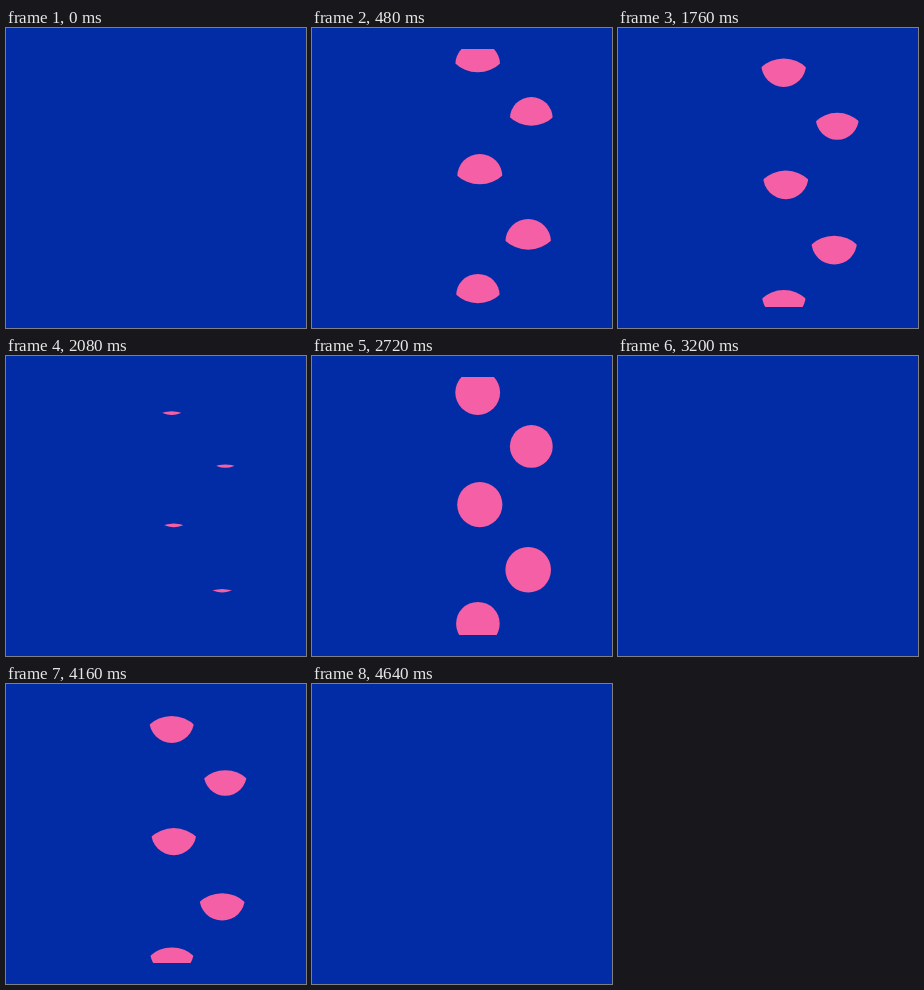
Write an HTML page with a canvas that moves like this. It is 300 px wide and 300 px high and loops after 4800 ms.

```html
<!DOCTYPE html>
<html lang="en">
<head>
<meta charset="utf-8">
<title>Lenses</title>
<style>
  html, body { margin: 0; height: 100%; overflow: hidden; background: #022ca6; }
  canvas { display: block; }
</style>
</head>
<body>
<canvas id="stage" width="300" height="300"></canvas>
<script>
const ctx = document.getElementById('stage').getContext('2d');
const LOOP = 4800, STEP = 80, TAU = Math.PI * 2;
const COVER = 1.48; // radius of the sliding disc, in dot radii

// x, y, radius
const dots = [
  [165.7, 36.5, 22.4],
  [219.3, 90.4, 21.4],
  [167.8, 148.6, 22.6],
  [216.2, 213.8, 22.8],
  [165.9, 267.7, 21.8]
];

function bezier(x1, y1, x2, y2) {
  const at = (a, b, s) => 3 * a * s * (1 - s) ** 2 + 3 * b * s * s * (1 - s) + s ** 3;
  return x => {
    if (x <= 0) return 0;
    if (x >= 1) return 1;
    let lo = 0, hi = 1;
    for (let i = 0; i < 30; i++) {
      const mid = (lo + hi) / 2;
      if (at(x1, x2, mid) < x) lo = mid; else hi = mid;
    }
    return at(y1, y2, lo);
  };
}
const easeInOut = bezier(0.42, 0, 0.58, 1);
const ease = bezier(0.25, 0.1, 0.25, 1);

const move = (from, to, p) => from + (to - from) * p;

// Vertical offset of the sliding disc, in dot radii
function offset(t) {
  const c = t < LOOP / 2 ? t : t - LOOP / 2 + 12;
  return c < 1100
    ? move(2.54, -2.49, easeInOut((c + 55) / 835))
    : move(-3.8, 2.54, ease((c - 1193) / 1160));
}

function disc(x, y, r) {
  ctx.beginPath();
  ctx.arc(x, y, r, 0, TAU);
}

function draw(t) {
  ctx.fillStyle = '#022ca6';
  ctx.fillRect(0, 0, 300, 300);
  const u = offset(t);
  if (Math.abs(u) >= 1 + COVER) return;
  ctx.fillStyle = '#f55fa5';
  ctx.save();
  ctx.beginPath();
  ctx.rect(0, 21, 300, 258);
  ctx.clip();
  for (const [x, y, r] of dots) {
    ctx.save();
    disc(x, y, r);
    ctx.clip();
    disc(x, y + u * r, COVER * r);
    ctx.fill();
    ctx.restore();
  }
  ctx.restore();
}

const start = performance.now();
function tick() {
  const t = (performance.now() - start) % LOOP;
  draw(Math.floor(t / STEP) * STEP);
  requestAnimationFrame(tick);
}
tick();
</script>
</body>
</html>
```
